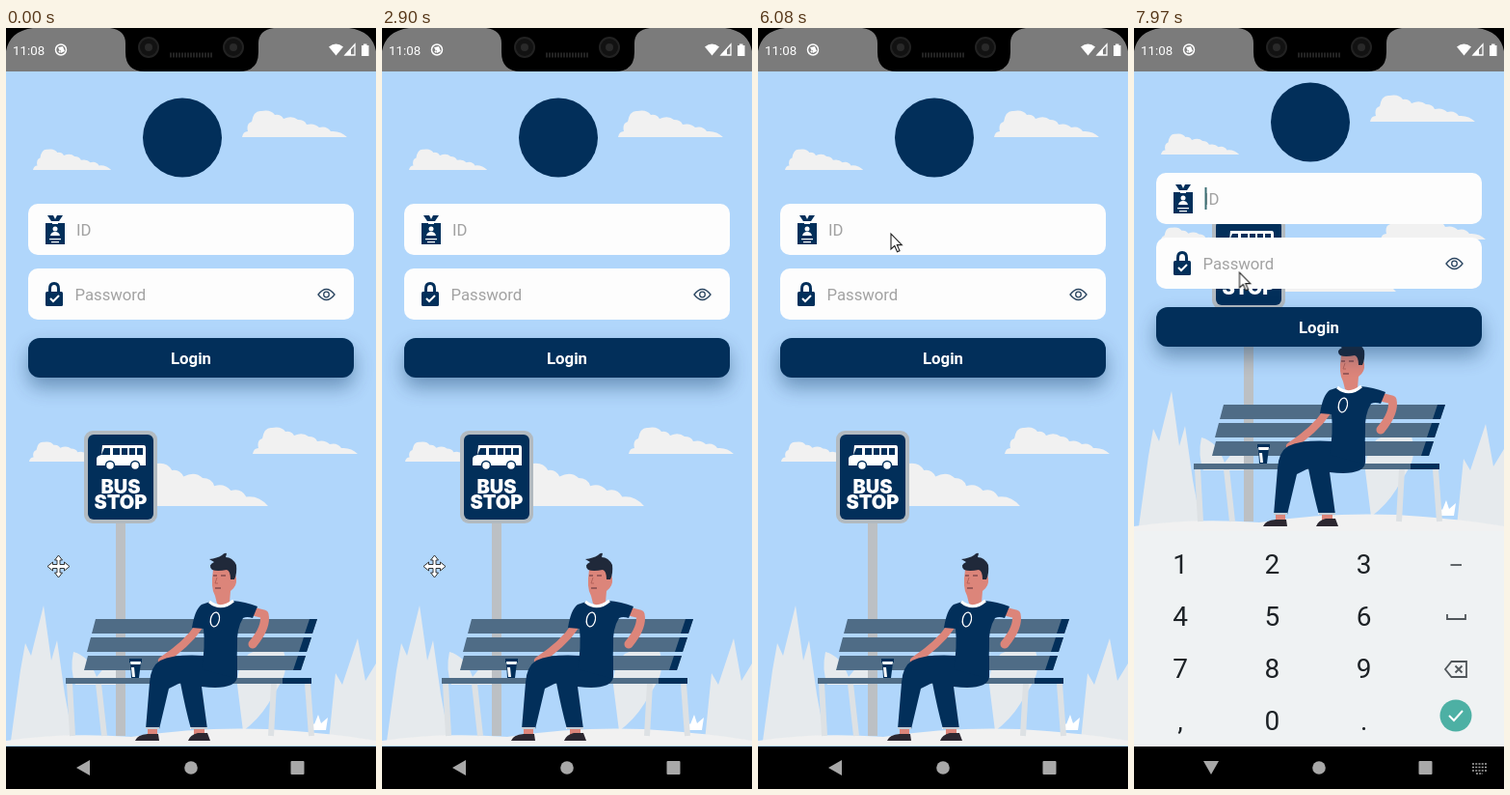
An HTML page for the animation above (8 s loop, 384 by 788 pixels).

```html
<!DOCTYPE html>
<html lang="en">
<head>
<meta charset="utf-8">
<title>Login screen</title>
<style>
  html, body { margin: 0; width: 100%; height: 100%; overflow: hidden; background: #000; }
  svg { display: block; width: 384px; height: 788px; font-family: Roboto, sans-serif; }
  .navy { fill: #022f5a; }
  .pale { fill: #f1f1f1; }
  .skin { fill: #dc857a; }
  .limb { fill: none; stroke: #dc857a; stroke-linecap: round; stroke-linejoin: round; }
  .hint { fill: #a2a2a2; font-size: 16.7px; }
  .key { font-size: 28px; text-anchor: middle; fill: #1d2226; }
  .line { fill: none; stroke: #50565a; stroke-width: 1.8; }
  .mid { transform-box: fill-box; transform-origin: center; }
</style>
</head>
<body>
<svg viewBox="0 0 384 788">
  <defs>
    <path id="cloud" class="pale" d="M0 28Q1 22 6 22Q4 14 10 12Q12 0 20 1Q30-1 34 5Q40 4 43 9Q52 5 58 10Q65 10 67 15Q75 13 80 18Q88 16 92 22Q102 21 109 28Z"/>
    <filter id="blur" x="-20%" y="-100%" width="140%" height="300%"><feGaussianBlur stdDeviation="10"/></filter>
  </defs>

  <rect width="384" height="788" fill="#b0d6fb"/>

  <g id="scene">
    <use href="#cloud" transform="translate(256 413)"/>
    <use href="#cloud" transform="translate(24 428) scale(.75)"/>
    <use href="#cloud" transform="translate(127 450) scale(1.33 1.61)"/>
    <g fill="#e6eaed">
      <path d="M5 738L15 665L20 637L26 650L39 598L47 655L53 634L61 690L70 738Z"/>
      <path d="M335 738L342 668L349 680L365 632L373 676L384 658V743H335Z"/>
      <path d="M72 680Q66 664 70 646Q86 650 94 672L112 650Q124 664 120 680Z"/>
      <path d="M240 680Q240 660 252 648Q268 640 288 645Q294 664 284 680L272 700Q262 716 246 728Z"/>
    </g>
    <path class="pale" d="M0 738Q60 729 130 734Q220 721 300 728Q350 732 384 738V743H0Z"/>
    <path d="M315 727L314 716L320 721L324 711L327 720L334 714L332 727Z" fill="#fff"/>
    <rect x="114" y="512" width="10" height="221" fill="#bcc0c4"/>
    <rect x="81" y="417" width="76" height="96" rx="9" fill="#b2bac0"/>
    <rect class="navy" x="85" y="421" width="68" height="88" rx="6"/>
    <path d="M100 432H143Q145 432 145 435V453H94V446Q94 443 99 442Z" fill="#fff"/>
    <g class="navy">
      <path d="M102 435H108V442H99Z"/>
      <path d="M111 435h7v7h-7zM120 435h6v7h-6zM128 435h6v7h-6zM136 435h6v7h-6z"/>
    </g>
    <g fill="#fff" stroke="#022f5a" stroke-width="1.5"><circle cx="108" cy="453" r="4.5"/><circle cx="134" cy="453" r="4.5"/></g>
    <g fill="#fff" font-family="Inter, sans-serif" font-weight="900" font-size="20" text-anchor="middle">
      <text x="119" y="482">BUS</text><text x="119" y="498">STOP</text>
    </g>

    <path d="M66 679L69 733M96 679L102 733M278 679L275 733M313 679L317 733" fill="none" stroke="#dde1e4" stroke-width="6"/>
    <g fill="#4f6c86">
      <path d="M93 612H323L318 627H89Z"/><path d="M88 631H317L312 646H84Z"/><path d="M85 650H311L306 665H81Z"/>
      <rect x="62" y="673" width="255" height="6"/>
    </g>
    <g class="navy">
      <path d="M315 612h8l-5 15h-8zM309 631h8l-5 15h-8zM303 650h8l-5 15h-8z"/>
      <rect x="287" y="673" width="30" height="6"/>
      <path d="M128 653H141V657H140L138 673H130L129 657H128Z"/>
    </g>
    <path d="M129 656H140L139.5 659H129.5ZM130 662h3l1 10h-3z" fill="#fff"/>

    <path class="limb" d="M256 604L268 607Q271 620 256 638" stroke-width="9"/>
    <path class="limb" d="M200 620Q188 638 162 655" stroke-width="8"/>
    <path class="skin" d="M147 724h10v9h-10zM195 724h11v9h-11z"/>
    <path d="M134 738Q136 732 147 731H158L159 738ZM189 738Q191 732 199 730H209L212 738Z" fill="#2c2730"/>
    <path class="navy" d="M206 650Q175 648 160 655Q150 661 149 678L145 726H159L169 684L181 678Q186 704 192 726H209L203 682Q238 686 240 672V650Z"/>
    <path d="M145 725h14M191 725h18" stroke="#fff" stroke-width="1.5"/>
    <path class="navy" d="M212 594Q223 603 235 593Q248 594 261 599L256 611Q250 609 246 611Q239 622 240 640L239 674L203 664Q207 640 205 622L193 621Q196 602 203 597Z"/>
    <path class="skin" d="M215 561Q212 580 217 588L219 596Q226 601 232 595L233 583Q240 578 239 570L236 558Z"/>
    <path d="M211 594Q223 604 236 593" fill="none" stroke="#fff" stroke-width="3"/>
    <ellipse cx="217" cy="612.5" rx="4.5" ry="7.5" transform="rotate(12 217 612)" fill="none" stroke="#fff" stroke-width="1.3"/>
    <path d="M211 550Q219 549 224 546Q227 543 229 544L228 548Q235 548 239 556Q240 565 237 571L233 571Q233 562 229 561Q219 563 214 561Q209 556 216 553Z" fill="#20293a"/>
    <path d="M215 567h4M223 567h5M217 580h6" stroke="#5a3038" stroke-width="1.2"/>
    <path d="M219 569l-2 6h3" fill="none" stroke="#b5625a"/>
  </g>

  <g id="header">
    <use href="#cloud" transform="translate(245 85)"/>
    <use href="#cloud" transform="translate(28 125) scale(.745 .79)"/>
    <circle class="navy" cx="183" cy="113.5" r="41"/>
  </g>

  <g id="form">
    <rect x="23" y="331" width="338" height="41" rx="12" fill="#022f5a" opacity=".4" filter="url(#blur)"/>
    <g fill="#fdfdfd"><rect x="23" y="182" width="338" height="53" rx="10"/><rect x="23" y="249" width="338" height="53" rx="10"/></g>
    <rect class="navy" x="23" y="321" width="338" height="41" rx="12"/>
    <text x="192" y="348" text-anchor="middle" font-size="16.8" font-weight="700" fill="#fff">Login</text>
    <path class="navy" d="M43 194h6l2 4 2-4h6l-4 6h-8zM41 202H61V224H41Z"/>
    <g fill="#fff"><rect x="48" y="200" width="6" height="3"/><circle cx="51" cy="208" r="2.5"/><path d="M46 215Q47 211 51 211T56 215ZM45 218h12v1.3h-12zM47 221h8v1.2h-8z"/></g>
    <path d="M45.5 275V270Q45.5 264.5 50 264.5T54.5 270V275" fill="none" stroke="#022f5a" stroke-width="3"/>
    <rect class="navy" x="41" y="273" width="18" height="15" rx="1.5"/>
    <path d="M46 280l3 3 6-6" fill="none" stroke="#fff" stroke-width="2"/>
    <text class="hint" x="73" y="215">ID</text>
    <text class="hint" x="71.5" y="282">Password</text>
    <g fill="none" stroke="#2a4560" stroke-width="1.3"><path d="M324 276Q332.5 265 341 276Q332.5 287 324 276Z"/><circle cx="332.5" cy="276" r="2.8"/></g>
    <rect id="caret" x="73.5" y="197" width="2" height="23" fill="#3c6f74"/>
  </g>

  <rect id="sheet" y="522" width="384" height="266" fill="#fcfcfc"/>
  <g id="keyboard">
    <rect y="521" width="384" height="300" fill="#eff2f3"/>
    <g id="keys">
      <path class="line" d="M328.5 556H340"/>
      <path class="line" d="M325 607V612H344V607"/>
      <path class="line" d="M323 664L329.5 656H345V672H329.5ZM333.5 660.5l7 7m0-7l-7 7"/>
      <circle cx="334" cy="712" r="16.5" fill="#4db0a4"/>
      <path d="M327 712l5 5 9-10" fill="none" stroke="#fff" stroke-width="2"/>
    </g>
  </g>

  <rect id="navbar" y="744" width="384" height="44"/>
  <g fill="#a8a8a8">
    <path id="back" class="mid" d="M73 766L87 758V774Z"/>
    <circle cx="192" cy="766" r="6.8"/>
    <rect x="295.5" y="759" width="14" height="14" rx="1"/>
    <path id="switch" d="M351 762H366M351 765.5H366M351 769H366M355 772H362" stroke="#a8a8a8" stroke-width="1.7" stroke-dasharray="2 1.25"/>
  </g>
  <path d="M0 766Q3 785 24 788H0ZM384 766Q381 785 360 788H384Z"/>

  <rect width="384" height="45" fill="#7b7b7b"/>
  <path d="M0 0H28Q4 3 0 24ZM384 0H356Q380 3 384 24ZM108 0Q124 2 124 16V25Q124 45 144 45H242Q262 45 262 25V16Q262 2 278 0Z"/>
  <g fill="#121212" stroke="#222" stroke-width="2"><circle cx="148" cy="20" r="10"/><circle cx="236" cy="20" r="10"/></g>
  <g fill="#292929"><circle cx="148" cy="20" r="4"/><circle cx="236" cy="20" r="4"/></g>
  <path d="M170 28H214" stroke="#232323" stroke-width="5" stroke-dasharray="2 1"/>
  <g fill="#fff">
    <text x="7" y="27.5" font-size="13.3">11:08</text>
    <circle cx="57" cy="22.5" r="5.5" fill="none" stroke="#fff" stroke-width="1.5"/>
    <path d="M54 20l5-1 2 5-4 2zM54 24l2 2 1-3z"/>
    <path d="M335 19.5Q342.5 13.5 350 19.5L342.5 28.5Z"/>
    <path d="M352 28L362 17V28Z" fill="none" stroke="#fff" stroke-width="1.3"/><path d="M352 28L358 21.5V28Z"/>
    <path d="M369 18h2v-1.5h3.5v1.5h2v11h-7.5z"/>
  </g>

  <path id="mover" d="M54.500 546l4 5h-2.500v4.500H60.500V553l5.500 4.500L60.500 562v-2.500H56V564h2.500l-4 5-4-5H53v-4.500h-4.500V562l-5.500-4.500L48.500 553v2.500H53V551h-2.500Z" fill="#fff" stroke="#222" stroke-width=".9"/>
  <g id="pointer"><path id="arrow" d="M0 0V16L3.8 12.5L6.5 18.7L9 17.6L6.3 11.6H11.3Z" fill="#fff" stroke="#222" stroke-width="1.1"/></g>
</svg>
<script>
const LOOP = 8000;
const svg = document.querySelector("svg");
const keys = document.getElementById("keys");

["123", "456", "789", ",0."].forEach((row, r) => [...row].forEach((char, c) => {
  const text = document.createElementNS(svg.namespaceURI, "text");
  text.setAttribute("class", "key");
  text.setAttribute("x", 48 + c * 95.3);
  text.setAttribute("y", 565 + r * 54);
  text.textContent = char;
  keys.append(text);
}));

const origin = document.timeline.currentTime ?? 0;

// rows: [ms, value]; the last value holds until the loop ends
function track(id, prop, rows, easing = "linear") {
  const last = rows[rows.length - 1][1];
  const frames = [...rows, [LOOP, last]].map(([ms, value]) => ({ offset: ms / LOOP, [prop]: value, easing }));
  const motion = document.getElementById(id).animate(frames, { duration: LOOP, iterations: Infinity });
  motion.startTime = origin;
}
const jump = (id, prop, rows) => track(id, prop, rows, "step-end");
const move = (x, y) => `translate(${x}px, ${y}px)`;

const FOCUS = 6880, RELAYOUT = 6970;

jump("scene", "transform", [[0, move(0, 0)], [RELAYOUT, move(0, -222)]]);
jump("header", "transform", [[0, move(0, 0)], [RELAYOUT, move(0, -16)]]);
jump("form", "transform", [[0, move(0, 0)], [RELAYOUT, move(0, -32)]]);
jump("caret", "opacity", [[0, 0], [FOCUS, 1], [7380, 0], [7880, 1]]);
jump("sheet", "opacity", [[0, 0], [FOCUS, 1]]);
jump("switch", "opacity", [[0, 0], [FOCUS, 1]]);

track("keyboard", "transform", [
  [0, move(0, 223)], [FOCUS, move(0, 110)], [6920, move(0, 75)], [6960, move(0, 45)],
  [7000, move(0, 23)], [7040, move(0, 9)], [7100, move(0, 0)]]);
track("keyboard", "opacity", [[0, 0], [FOCUS - 1, 0], [FOCUS, .6], [6920, .85], [7040, 1]]);
track("keys", "opacity", [[0, 0], [FOCUS, .35], [6920, .6], [7060, 1]]);
track("navbar", "opacity", [[0, 1], [FOCUS - 1, 1], [FOCUS, .47], [6930, .47], [7100, 1]]);
track("back", "transform", [[0, "rotate(0deg)"], [FOCUS, "rotate(0deg)"], [6920, "rotate(-12deg)"], [7080, "rotate(-90deg)"]]);

jump("mover", "opacity", [[0, 1], [4480, 0]]);
jump("pointer", "opacity", [[0, 0], [4480, 1]]);
track("arrow", "transform", [
  [0, move(55, 557)], [4800, move(55, 557)], [5120, move(66, 466)], [5960, move(136, 226)],
  [6080, move(138, 213)], [6300, move(138, 207)], [7800, move(138, 207)], [7970, move(109.5, 253)]]);
</script>
</body>
</html>
```
